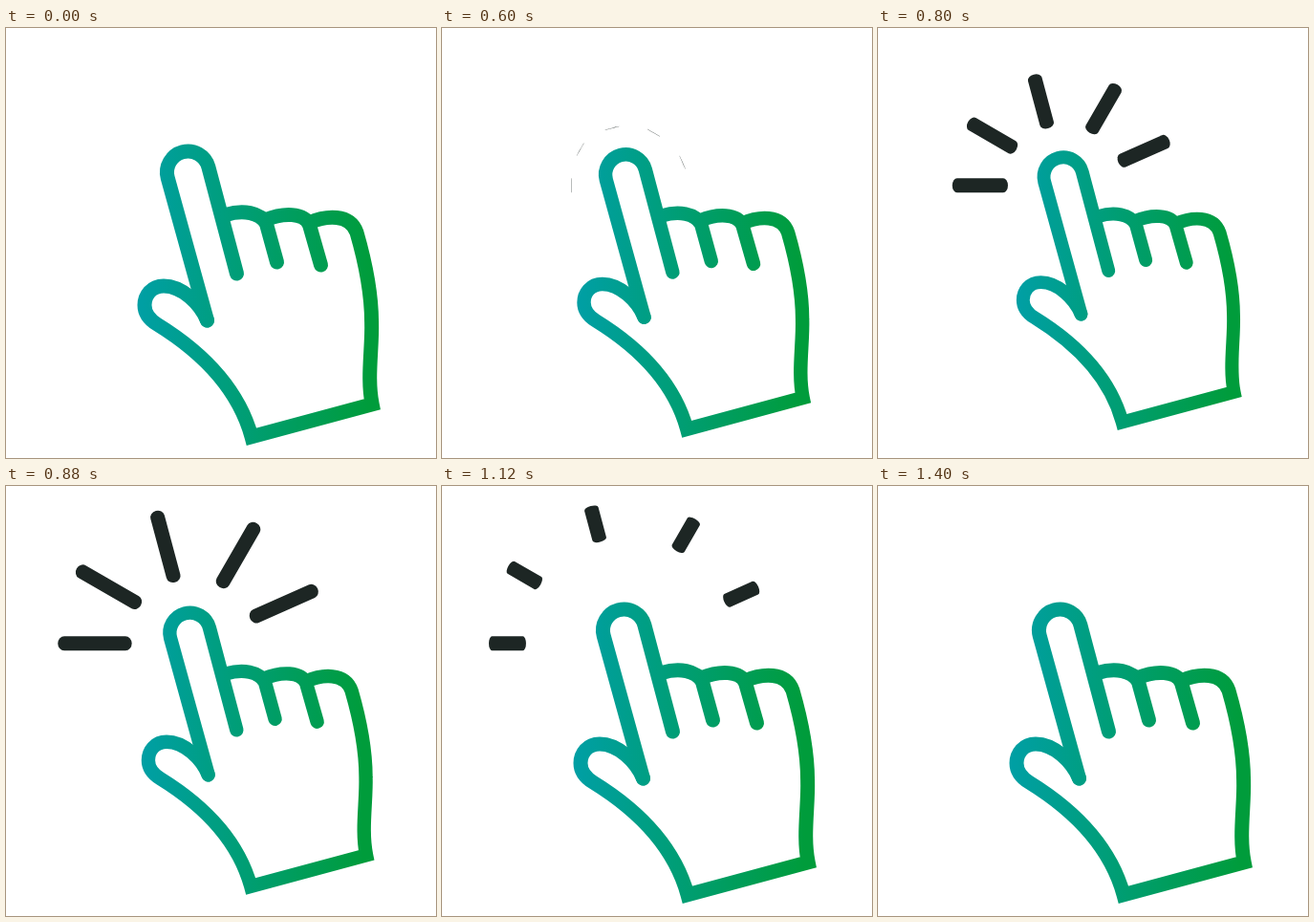
Animation of 450x450 px, one loop 2000 ms. Source, as an HTML page without scripts:

```html
<!DOCTYPE html>
<html lang="en">
<head>
<meta charset="utf-8">
<title>Tapping hand</title>
<style>
  html, body { margin: 0; width: 100%; height: 100%; overflow: hidden; background: #fff; }
  svg { display: block; width: 100%; height: 100%; }
  .hand { fill: none; stroke: url(#tint); stroke-width: 15; stroke-linecap: round; stroke-miterlimit: 10; }
  .rays { fill: #1d2624; }
</style>
</head>
<body>
<svg viewBox="0 0 450 450">
  <defs>
    <linearGradient id="tint" gradientUnits="userSpaceOnUse" x1="142" y1="0" x2="380" y2="0">
      <stop offset="0" stop-color="#009fa3"/>
      <stop offset="1" stop-color="#009c3b"/>
    </linearGradient>
    <!-- grows from its inner end, then shrinks towards its outer end -->
    <g id="ray" transform="translate(87)">
      <g>
        <animateTransform attributeName="transform" type="scale" dur="2s" repeatCount="indefinite"
          calcMode="spline" values="1 1;1 1;0 1;0 1" keyTimes="0;.4;.7;1"
          keySplines="0 0 1 1;.333 0 .667 1;0 0 1 1"/>
        <g transform="translate(-87)">
          <rect y="-7.5" width="87" height="15" rx="7.5">
            <animateTransform attributeName="transform" type="scale" dur="2s" repeatCount="indefinite"
              values="0 1;0 1;1 1;1 1" keyTimes="0;.3;.45;1"/>
          </rect>
        </g>
      </g>
    </g>
  </defs>

  <g class="rays">
    <use href="#ray" transform="translate(136 164.7) rotate(180)"/>
    <use href="#ray" transform="translate(144.8 127.2) rotate(210)"/>
    <use href="#ray" transform="translate(178 105) rotate(255)"/>
    <use href="#ray" transform="translate(221.5 109.8) rotate(300)"/>
    <use href="#ray" transform="translate(251.5 140.7) rotate(336)"/>
  </g>

  <g transform="translate(238 217)">
    <g>
      <animateTransform attributeName="transform" type="scale" dur="2s" repeatCount="indefinite"
        calcMode="spline" values="1;1;.925;.925;1;1" keyTimes="0;.24;.36;.39;.5;1"
        keySplines="0 0 1 1;.333 0 .667 1;0 0 1 1;.333 0 .667 1;0 0 1 1"/>
      <g class="hand" transform="translate(-238 -217)">
        <!-- index finger -->
        <path d="M241.5 257 L211.8 145.3 A22 22 0 0 0 169.2 156.7 L210.5 306"/>
        <!-- thumb, palm and little finger -->
        <path d="M210.5 306 C203 288 184 270 165 270 C152 270 145 280 145 290
          C145 299 150 305 158 310 C205 339 243 377 257 427.8 L383.2 393.8
          C377.5 366 383.5 335 382.6 308 C382.5 275 376 245 367 214 C360 194 335 196 317 204"/>
        <path d="M230 195.500 C248 190 266 193 272.500 205 L283.500 245"/>
        <path d="M271 201 C290 193 312 193 317.500 206 L329.500 248"/>
      </g>
    </g>
  </g>
</svg>
</body>
</html>
```
